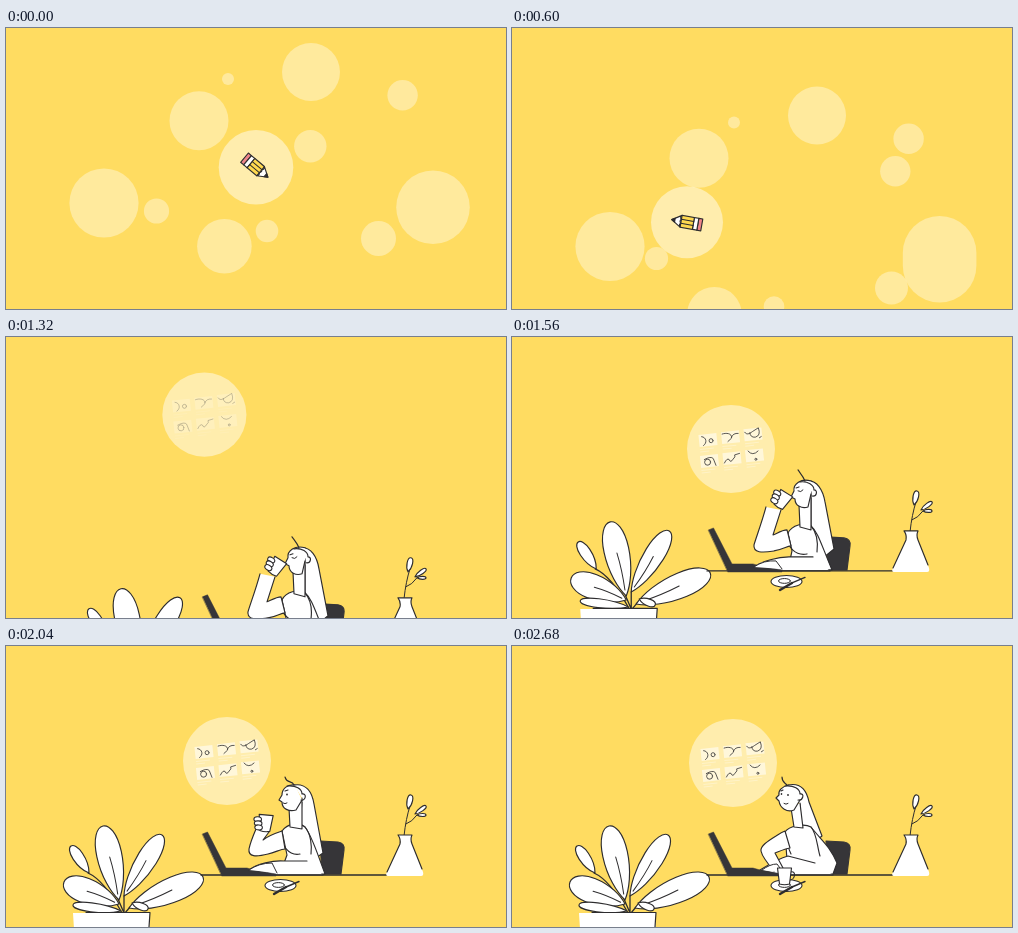
An HTML page with a canvas for the animation above (2920 ms loop, 500 by 281 pixels).

```html
<!DOCTYPE html>
<html>
<head>
<meta charset="utf-8">
<title>Coffee and ideas</title>
<style>
html, body { margin: 0; width: 100%; height: 100%; overflow: hidden; background: #ffdc61; }
canvas { display: block; width: 500px; height: 281px; }
</style>
</head>
<body>
<canvas id="stage" width="500" height="281"></canvas>
<script>
const g = document.getElementById('stage').getContext('2d');
const INK = '#2d2c2e', DARK = '#363538', PAPER = '#fff', LOOP = 2920, STEP = 80;
const clamp = (v, a = 0, b = 1) => Math.max(a, Math.min(b, v));
const ramp = (n, a, b) => clamp((n - a) / (b - a));
const smooth = k => k * k * (3 - 2 * k);
const mix = (a, b, k) => a + (b - a) * k;

function shape(d, fill = PAPER, stroke = INK, width = 1.15) {
  const p = new Path2D(d);
  if (fill) { g.fillStyle = fill; g.fill(p); }
  if (stroke) { g.strokeStyle = stroke; g.lineWidth = width; g.stroke(p); }
}
const line = (d, width) => shape(d, null, INK, width);

function disc(x, y, rx, ry, fill, stroke) {
  g.beginPath();
  g.ellipse(x, y, rx, ry, 0, 0, 7);
  if (fill) { g.fillStyle = fill; g.fill(); }
  if (stroke) { g.strokeStyle = INK; g.lineWidth = stroke; g.stroke(); }
}

function at(x, y, angle, draw, scale = 1) {
  g.save();
  g.translate(x, y);
  g.rotate(angle * Math.PI / 180);
  g.scale(scale, scale);
  draw();
  g.restore();
}

// Path between two of three poses with the same commands, k in 0..2
function pose(paths, k) {
  const i = k < 1 ? 0 : 1, to = paths[i + 1].match(/-?[\d.]+/g);
  let j = 0;
  return paths[i].replace(/-?[\d.]+/g, v => mix(+v, +to[j++], k - i).toFixed(2));
}

// Main bubble every two steps: x, y, radius, pencil angle
const route = [
  [250, 139.3, 37.3, 40], [295, 124, 37, 64], [327, 134, 37, 93], [278, 194, 36.5, 138],
  [175, 194.3, 36, 190], [68, 118, 37.5, 268], [85, 57.3, 38.5, 343], [135, 41, 39, 375],
  [182, 60, 41, 400], [210, 95, 43, 410], [219, 112, 44, 410], [220, 113.5, 44, 410],
  [220.7, 114.4, 44, 410], [221, 115, 44, 410], [221, 117, 44, 410]
];
function bubbleAt(n) {
  const u = clamp(n / 2, 0, route.length - 1), i = Math.floor(u), k = u - i;
  const key = j => route[clamp(j, 0, route.length - 1)];
  return route[i].map((b, c) => {
    const a = key(i - 1)[c], d = key(i + 1)[c], e = key(i + 2)[c];
    return b + k * ((d - a) + k * ((2 * a - 5 * b + 4 * d - e) + k * (3 * (b - d) + e - a))) / 2;
  });
}

// Radius, x, y, then the first and second push
const bubbles = [
  [29.5, 193, 92.7, -.7, -.5, -6, -6], [6, 222, 51], [29, 305, 44], [15.2, 396.6, 67.3],
  [34.6, 98, 175], [12.6, 150.5, 183, -6, 3, -6, 4], [27.3, 218.4, 218.3, 0, .8, -16, 24.5],
  [11.3, 261, 203, .5, 4, 1, 32], [16.2, 304.3, 118.3, 60, -15.3, 79, -18.5],
  [17.5, 372.5, 210.5, 7.5, 5, 7, 6], [36.8, 427, 179.3, .6, 1, .6, 8.5]
];
function drawBubbles(n) {
  const scroll = n < 4 ? n / 4 : 1 + 42.5 * ((n - 4) / 4) ** 2.8;
  const first = smooth(ramp(n, 0, 4)), second = smooth(ramp(n, 4, 8));
  g.fillStyle = 'rgba(255,255,255,.38)';
  for (const [r, x, y, ax = 0, ay = 0, bx = 0, by = 0] of bubbles) {
    const px = x + mix(ax * first, bx, second), py = y + mix(ay * first, by, second) + scroll;
    const slack = r > 36 ? 6.5 * ramp(n, 7, 8) : 0;
    const size = r < 20 && ax ? r - first : r;
    g.beginPath();
    g.roundRect(px - size, py - size - slack, size * 2, (size + slack) * 2, size);
    g.fill();
  }
}

function pencil() {
  shape('M-15-6H-11V6H-15Z', '#f0858a');
  shape('M-11-6H-6.5V6H-11Z');
  shape('M-6.5-6H6V6H-6.5Z', '#ffd94f');
  line('M-6.5-2H6M-6.5 2H6', 1);
  shape('M6-6L15.5 0L6 6Q8 3 6 2Q8 0 6-2Q8-3 6-6Z');
  shape('M12.3-2L15.5 0L12.3 2Z', INK);
}

const doodles = [
  'M-6-4C-1-3-1 3-5 5M5 1A2 2 0 1 1 1 1A2 2 0 1 1 5 1',
  'M-8-4C-4-5 2-4 1 1L-3 4M1 0Q3-4 8-3',
  'M-8-3C-6 1-2-2 0-3L6-6Q8 2 2 3Q-3 3-3-2M6 4L8 3',
  'M1 1A3 3 0 1 1-5 1A3 3 0 1 1 1 1M-5-2Q2-5 4-2L6 5',
  'M-8 4Q-5-1-3 1Q-2 5 1 1Q4-1 3-3L8-4',
  'M-6-5Q-2 1 4-4M2 4A1 1 0 1 1 0 4A1 1 0 1 1 2 4'
];
function cards(x, y, k) {
  g.globalAlpha = k;
  doodles.forEach((d, i) => {
    const c = i % 3, r = i > 2 ? 1 : 0;
    at(x - 23 + c * 22.5 + r * 1.5, y - 9 - c * 2.8 + r * 21, -6, () => {
      g.fillStyle = 'rgba(255,255,255,.55)';
      g.fillRect(-9, -6, 18, 12);
      g.fillStyle = 'rgba(255,255,255,.32)';
      g.fillRect(-9, 8, 14, 1);
      g.fillRect(-9, 10.5, 9, 1);
      line(d, .75);
    });
  });
  g.globalAlpha = 1;
}

// Teardrop from base to a rounded tip
function leaf(x, y, tipX, tipY, w, rib = 1) {
  const l = Math.hypot(tipX - x, tipY - y), h = w / 2;
  at(x, y, Math.atan2(tipY - y, tipX - x) * 180 / Math.PI, () => {
    shape(`M0 0C${l * .12} ${-h * .5} ${l * .35} ${-h} ${l * .62} ${-h}` +
      `C${l * 1.127} ${-h} ${l * 1.127} ${h} ${l * .62} ${h}` +
      `C${l * .35} ${h} ${l * .12} ${h * .5} 0 0Z`);
    if (rib) line(`M${l * .08} 0Q${l * .35} 1.5 ${l * .58} 0`, 1);
  });
}

function plant() {
  line('M82 227Q98 234 116 267M112 253L118 267M118 250V267M124 261L119 267', 1.3);
  leaf(83, 227, 65, 200, 11, 0);
  leaf(113, 254, 97, 180, 25);
  leaf(118, 250, 156, 189, 20);
  leaf(113, 258, 58, 236, 25);
  leaf(115, 265, 67, 259, 9, 0);
  leaf(123, 262, 197, 231, 25);
  leaf(126, 257, 142, 263, 7, 0);
  shape('M67 267H144L142 330H71Z', PAPER, null);
  line('M80 266.5H144L143 281', 1.2);
}

function vase() {
  line('M398 190Q400 172 404 160M400 178Q406 176 411 169', 1);
  leaf(402, 163, 405, 149, 5.5, 0);
  leaf(409, 168, 420, 160, 4, 0);
  leaf(411, 169, 420, 169, 3, 0);
  shape('M392 189H406Q404 193 406 198L417 226Q418 230 415 230H382Q379 230 381 226L394 198Q395 193 392 189Z', PAPER, null);
  line('M381 226L394 198Q395 193 392 189H406Q404 193 406 198L416 223');
}

const woman = {
  hair: ['M295 139C305 138 311 148 313 160L322 207L311 216L299 192L299 150',
    'M288 139C300 137 306 146 308 158L317 207L307 214L294 190L296 152',
    'M276 139C290 136 295 146 297 156L310 190L302 196L290 190L288 158'],
  torso: ['M276 191C280 183 292 180 299 184C306 190 309 202 320 228L276 228L280 209Z',
    'M276 185C282 177 293 176 299 181C306 190 310 204 319 228L274 228L281 209Z',
    'M273 186C277 180 292 177 299 181C309 194 318 200 325 217L321 228L276 228L279 206Z'],
  sleeve: ['M276 191C273 206 285 214 295 212M299 184C305 191 306 202 305 210',
    'M276 185C273 200 284 210 294 208M299 181C305 188 306 200 305 208',
    'M273 186C275 198 276 202 279 208M299 181C305 188 305 200 308 210'],
  rest: ['M301 215L277 215C266 215 250 219 242 225L268 229L318 229',
    'M301 215L278 215C268 214 250 218 243 224L268 229L317 229',
    'M303 217L276 210C268 212 256 219 248 224L270 229L321 229'],
  neck: ['M287 163L288 185L299 188L299 156', 'M283 162L284 181L296 183L296 156', 'M279 162L282 181L291 182L288 157'],
  face: ['M299 139C289 136 281 142 282 149L279 155L283 157C283 164 290 167 296 165L299 152',
    'M289 139C281 138 276 143 276 149L273 154L276 156C276 163 283 166 290 164L296 154',
    'M277 139C270 140 266 145 267 149L264 152L267 155C268 162 275 167 282 164L288 154'],
  detail: ['M293 139C291 134 288 131 286 128M288 140C296 139 302 143 302 148C306 148 305 155 300 154M284 146L287 145',
    'M288 139C286 134 281 138 279 131M281 140C290 139 296 143 296 148C301 147 300 155 295 154M279 145L282 144',
    'M275 139C272 136 270 136 270 131M273 140C282 139 288 143 288 148C293 147 291 155 286 154M269 145L271 144'],
  arm: ['M254 165C250 180 244 196 242 203C241 211 250 211 262 209C270 208 275 204 279 204L275 188C270 188 264 192 261 193L269 168',
    'M250 183C247 190 244 198 243 203C242 211 250 211 262 208C270 206 275 203 279 203L276 185C270 187 262 190 257 194L263 186',
    'M262 225C256 218 250 210 249 205C248 200 256 195 264 190C267 188 270 186 273 185L278 202C272 203 266 206 263 207L271 222']
};

function cup(k) {
  const spot = pose(['270.5 158 32', '259.5 177 5', '272.5 230 0'], k).split(' ').map(Number);
  at(...spot, () => {
    if (k > 1.6) line('M6-4C12-6 11 4 5 4');
    shape('M-7-8H7L5 8Q0 9.5-5 8Z');
    if (k < 1.6) for (const y of [-3, 1, 5]) disc(-7.5 + y * .2, y, 3.8, 2.5, PAPER, 1.1);
  });
}

function person(head, arm) {
  const part = (name, k, fill) => shape(pose(woman[name], k), fill);
  part('hair', head);
  part('torso', arm);
  part('rest', arm);
  part('sleeve', arm, null);
  part('neck', head);
  part('face', head);
  line(pose(woman.detail, head), 1.15);
  if (head < .5) line('M286 149Q289 151 291 148', 1);
  else {
    const [x, y] = pose(['289 147', '281 148.5', '276 149'], head).split(' ').map(Number);
    disc(x, y, .9, 1.1, INK);
    if (head > 1.4) disc(x - 6.5, y - 1, .8, 1, INK);
    line(`M${x - 4} ${y + 8.5}Q${x - 2} ${y + 10} ${x} ${y + 8.5}`, 1);
  }
  part('arm', arm);
}

function desk(n) {
  const head = smooth(ramp(n, 20, 26)) + .7 * smooth(ramp(n, 27, 31)) + .3 * ramp(n, 32, 34);
  const arm = smooth(ramp(n, 20, 26)) + smooth(ramp(n, 26, 31));
  shape('M314 195L332 196Q339 197 338 204L335 228H316Z', DARK, DARK);
  person(head, arm);
  line('M195 229H381', 1.3);
  shape('M196.5 188L201.5 186L220 222L241 222L248 224L270 228V230H216Z', DARK, DARK, .5);
  shape(pose(['M242 225Q252 218 264 219L270 227', 'M243 224Q253 217 266 217L271 227',
    'M250 224Q258 218 265 218L271 226'], arm), PAPER, INK, 1);
  disc(274.5, 239.5, 15.5, 6, PAPER, 1.1);
  disc(272.5, 239, 6, 2.4, null, 1);
  line('M268 248L280 241', 2.4);
  line('M280 241L293 235.5', 1.4);
  cup(arm);
  vase();
}

function draw(n) {
  g.fillStyle = '#ffdc61';
  g.fillRect(0, 0, 500, 281);
  if (n < 13) drawBubbles(n);
  const [x, y, r, angle] = bubbleAt(n);
  disc(x, y, r, r, 'rgba(255,255,255,.48)');
  const fade = 1 - ramp(n, 14, 17);
  if (fade) at(x, y, angle, pencil, fade);
  const shown = ramp(n, 16, 19);
  if (shown) cards(x, y, shown);
  if (n > 14) {
    const rise = 270 * ramp(n, 26, 15) ** 6.6;
    at(rise * .25, rise, 0, plant);
    at(0, rise, 0, () => desk(n));
  }
}

g.lineJoin = g.lineCap = 'round';
const start = performance.now();
function tick() {
  const t = Math.max(0, performance.now() - start) % LOOP;
  draw(Math.floor((t + STEP / 2) / STEP));
  requestAnimationFrame(tick);
}
tick();
</script>
</body>
</html>
```
